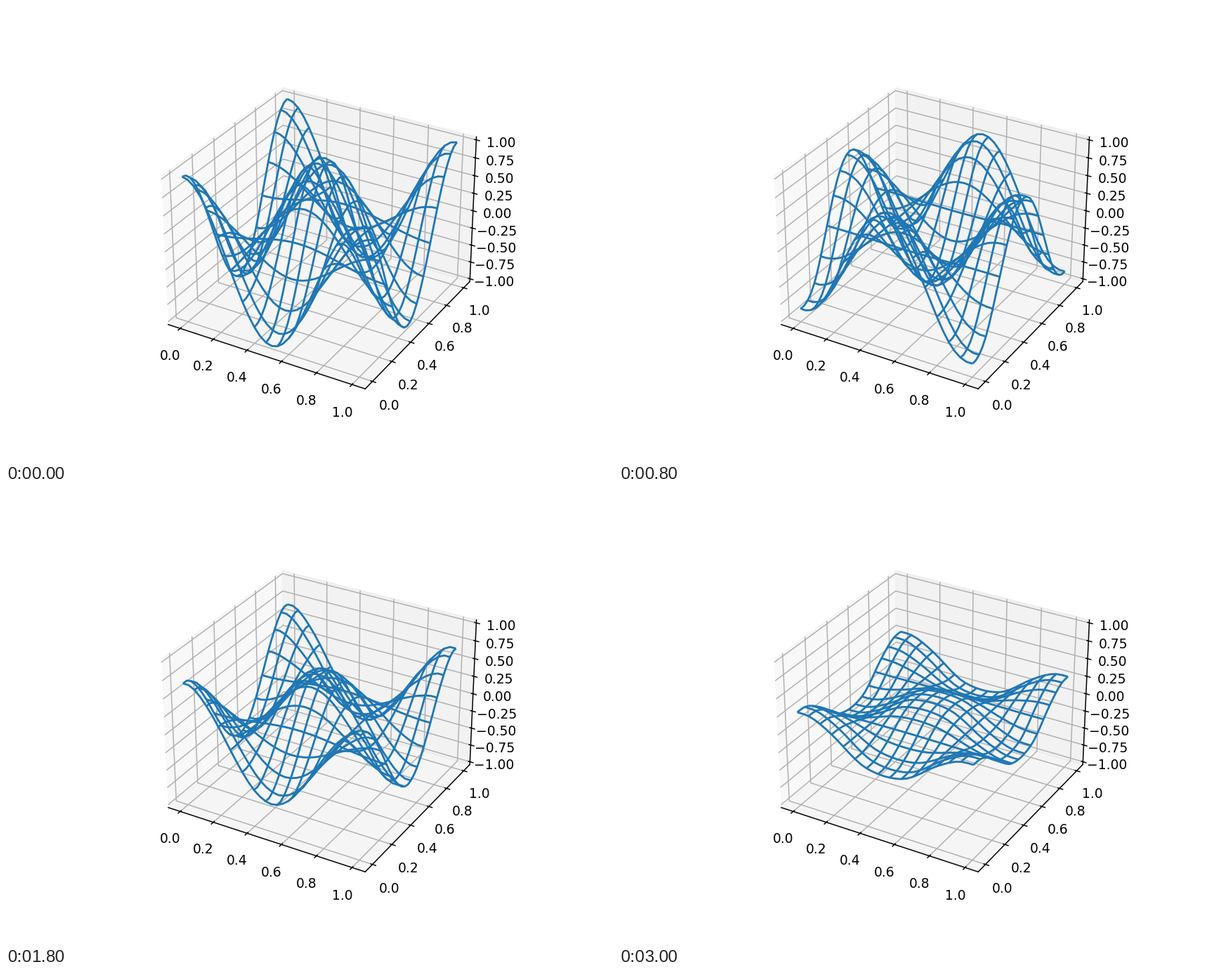
Animation of 864x648 px, one loop 3200 ms. Source, as a matplotlib script:

```python
import numpy as np
import matplotlib.pyplot as plt
from matplotlib.animation import FuncAnimation

N_FRAMES, INTERVAL = 16, 200
CELLS = 30              # grid cells along each side
COURANT2 = 0.5          # (c dt / dx)^2, the stability limit in 2D
STEPS_PER_FRAME = 10


def laplacian(u):
    return (u[2:, 1:-1] + u[:-2, 1:-1] + u[1:-1, 2:] + u[1:-1, :-2]
            - 4 * u[1:-1, 1:-1])


def reflect(u):
    """Zero slope at the walls: copy the neighbouring row or column."""
    u[0], u[-1] = u[1], u[-2]
    u[:, 0], u[:, -1] = u[:, 1], u[:, -2]


def solve(u0, steps):
    """Leapfrog solution of the wave equation, starting at rest."""
    first = u0.copy()
    first[1:-1, 1:-1] += COURANT2 / 2 * laplacian(u0)
    reflect(first)
    history = [u0, first]
    for _ in range(steps - 1):
        old, now = history[-2:]
        new = 2 * now - old
        new[1:-1, 1:-1] += COURANT2 * laplacian(now)
        reflect(new)
        history.append(new)
    return history


def padded(lo, hi):
    pad = (hi - lo) / 48
    return lo - pad, hi + pad


side = np.linspace(0, 1, CELLS + 1)
X, Y = np.meshgrid(side, side)
start = np.cos(2 * np.pi * X) * np.cos(2 * np.pi * Y)
history = solve(start, (N_FRAMES - 1) * STEPS_PER_FRAME + 1)
surfaces = [start] + history[STEPS_PER_FRAME + 1::STEPS_PER_FRAME]

fig = plt.figure(figsize=(6.4, 4.8), dpi=135)
ax = fig.add_subplot(projection="3d")
ax.set_xticks(np.linspace(0, 1, 6))
ax.set_yticks(np.linspace(0, 1, 6))
ax.set_zticks(np.linspace(-1, 1, 9))
ax.set_xlim(*padded(-0.05, 1.05))
ax.set_ylim(*padded(-0.05, 1.05))
ax.set_zlim(*padded(-1, 1))


def update(i):
    for mesh in list(ax.collections):
        mesh.remove()
    return [ax.plot_wireframe(X, Y, surfaces[i], rstride=2, cstride=2,
                              color="C0")]


anim = FuncAnimation(fig, update, frames=N_FRAMES, interval=INTERVAL,
                     init_func=lambda: update(0), repeat=True, repeat_delay=0)
plt.show()
```
